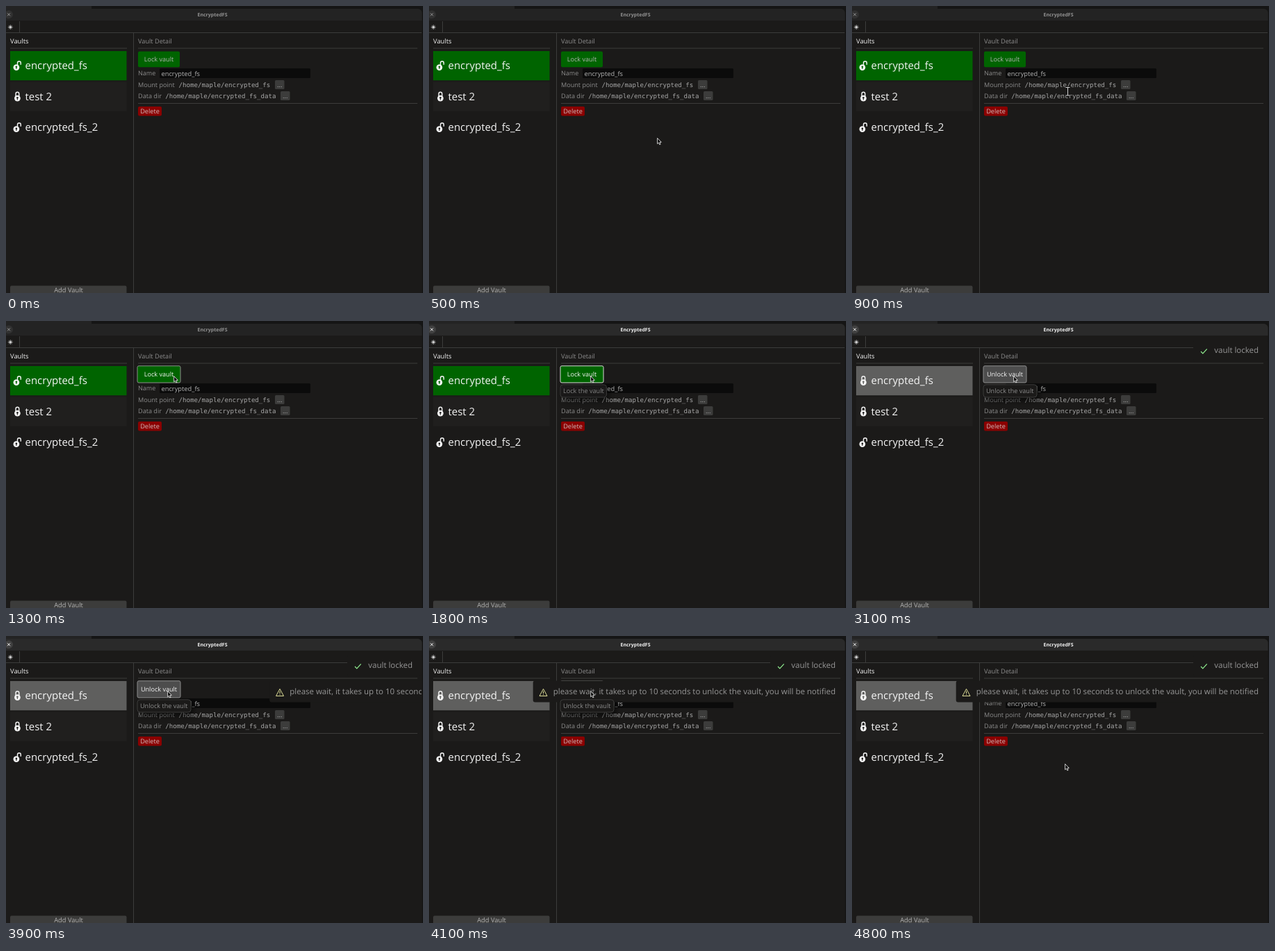
Recreate the animation shown at these times as an HTML page with a canvas. Size 600 by 414 pixels, loop 5 s.

```html
<!DOCTYPE html>
<html lang="en">
<head>
<meta charset="utf-8">
<title>EncryptedFS</title>
<style>
html, body { margin: 0; width: 100%; height: 100%; overflow: hidden; background: #1b1a19; }
canvas { display: block; }
</style>
</head>
<body>
<canvas id="stage" width="600" height="414"></canvas>
<script>
const c = document.getElementById('stage').getContext('2d');
const LOOP = 5000, STEP = 100;
const BG = '#1b1a19', LINE = '#3c3c3b', DIM = '#8c8c8c', MID = '#b4b4b4', WHITE = '#f4f4f4';
const SANS = '"Open Sans", "Noto Sans", sans-serif';
const MONO = '"DejaVu Sans Mono", monospace';

// Pointer positions, one per step
const ENTER = [[592, 254], [520, 243], [443, 224], [375, 204], [328, 190], [306, 184],
  [306, 172], [309, 150], [310, 123], [292, 100], [266, 86], [246, 79], [241, 79], [236, 79], [232, 79]];
const LEAVE = [[238, 83], [256, 98], [279, 126], [297, 160], [306, 184]];

function pointerAt(t) {
  if (t < 100) return null;
  const path = t < 4400 ? ENTER : LEAVE;
  const i = Math.floor((t - (t < 4400 ? 100 : 4400)) / STEP);
  return path[Math.min(i, path.length - 1)];
}

const inside = (p, x1, y1, x2, y2) => p && p[0] >= x1 && p[0] <= x2 && p[1] >= y1 && p[1] <= y2;

function box(x1, y1, x2, y2, fill, r = 0, stroke, width = 1) {
  c.beginPath();
  c.roundRect(x1, y1, x2 - x1, y2 - y1, r);
  if (fill) { c.fillStyle = fill; c.fill(); }
  if (stroke) { c.strokeStyle = stroke; c.lineWidth = width; c.stroke(); }
}

function text(s, x, y, color = DIM, size = 9.1, align = 'left', font = SANS, weight = 400) {
  c.font = `${weight} ${size}px ${font}`;
  c.textAlign = align;
  c.fillStyle = color;
  c.fillText(s, x, y);
}

function line(points, color, width = 1, close = false) {
  c.beginPath();
  points.forEach(([x, y]) => c.lineTo(x, y));
  if (close) c.closePath();
  c.strokeStyle = color;
  c.lineWidth = width;
  c.stroke();
}

function disc(x, y, r, color) {
  c.beginPath();
  c.arc(x, y, r, 0, 7);
  c.fillStyle = color;
  c.fill();
}

function padlock(y, open, hole) {
  const x = open ? 14.9 : 16.4, sx = open ? 18.9 : x, sy = y - 4;
  c.beginPath();
  c.moveTo(sx - 2.4, y);
  c.lineTo(sx - 2.4, sy);
  c.arc(sx, sy, 2.4, Math.PI, 0);
  c.lineTo(sx + 2.4, open ? sy + 2.5 : y);
  c.strokeStyle = WHITE;
  c.lineWidth = 1.4;
  c.stroke();
  disc(x, y + 2.4, 4.4, WHITE);
  disc(x, y + 1.5, 1.3, hole);
  line([[x, y + 1.5], [x, y + 4.8]], hole, 1.1);
}

function row(y, name, open, fill) {
  if (fill) box(6, y, 173.5, y + 42.3, fill);
  padlock(y + 21.2, open, fill || BG);
  text(name, 27.5, y + 26, WHITE, 15);
}

function frameWindow(active) {
  box(0, 0, 600, 414, '#151515');
  box(0, 0, 123, 5, '#232323');
  box(-6, 4, 598.5, 420, BG, 6);
  box(-6, 4, 598.5, 21, active ? '#2a2a2a' : '#232323', [6, 6, 0, 0]);
  disc(4, 12.3, 6, active ? '#404040' : '#313131');
  const ink = active ? '#f2f2f2' : '#929292';
  line([[2, 10.3], [6, 14.3]], ink);
  line([[6, 10.3], [2, 14.3]], ink);
  text('EncryptedFS', 297, 14.8, ink, 7, 'center', SANS, 700);

  for (let i = 0; i < 4; i++) {
    const a = i * Math.PI / 4, dx = 3.4 * Math.cos(a), dy = 3.4 * Math.sin(a);
    line([[6.3 - dx, 30.5 - dy], [6.3 + dx, 30.5 + dy]], '#d0d0d0', 0.8);
  }
  disc(6.3, 30.5, 1.6, '#d0d0d0');
  line([[19.5, 22], [19.5, 38]], LINE);
  line([[0, 38.5], [598, 38.5]], LINE);
  line([[183.5, 39], [183.5, 414]], LINE);
  line([[6, 61], [174, 61]], LINE);
  for (const y of [61, 140.5]) line([[190, y], [592, y]], LINE);
}

function pathRow(label, path, x, y, bx) {
  text(label, 190, y);
  text(path, x, y, '#a6a6a6', 9.15, 'left', MONO);
  box(bx, y - 9.5, bx + 13.5, y + 3.5, LINE, 1.5);
  text('...', bx + 6.7, y, MID, 9.1, 'center');
}

function lockButton(locked, hover, pressed) {
  const label = locked ? 'Unlock vault' : 'Lock vault';
  const fill = locked ? (hover ? '#4d4d4d' : LINE) : '#006400';
  if (hover) box(189, 64.8, 251, 89, fill, 2, pressed ? '#d8d8d8' : '#8c8c8c', 1);
  else box(190, 65.5, 250, 88.3, fill, 2);
  text(label, 220, 80, hover ? WHITE : MID, 9.1, 'center');
}

function tooltip(label, right, alpha) {
  c.save();
  c.globalAlpha = alpha;
  c.shadowColor = 'rgba(0,0,0,.5)';
  c.shadowOffsetX = 4;
  c.shadowOffsetY = 6;
  c.shadowBlur = 7;
  box(189, 92, right, 110, BG, 4);
  c.shadowColor = 'transparent';
  box(189, 91.8, right, 110, null, 4, LINE);
  text(label, 193, 104);
  c.restore();
}

function toast(left, top, born, t, label, icon) {
  const v = Math.min(1, (t - born) / 250);
  if (v <= 0) return;
  c.save();
  c.beginPath();
  c.rect(0, 21, 598, 393);
  c.clip();
  c.translate((598 - left) * (1 - v) ** 3, 0);
  box(left, top, 598, top + 31, BG, 3);
  text(label, 585, top + 19, '#969696', 11.47, 'right');
  icon();
  c.restore();
}

const check = () => line([[502, 44], [504.8, 46.9], [510.7, 40.3]], '#90ee90', 1.2);

function warning() {
  line([[164.5, 76.3], [170, 86.5], [159, 86.5]], '#dcdc96', 1, true);
  line([[164.5, 79.5], [164.5, 83]], '#dcdc96');
  line([[164.5, 84], [164.5, 85.1]], '#dcdc96');
}

function pointer(p, beam) {
  c.save();
  c.translate(p[0], p[1]);
  if (beam) {
    for (const [color, w] of [['#111', 2.4], ['#d8d8d8', 1]]) {
      line([[0.5, -5], [0.5, 6]], color, w);
      line([[-2.5, -5.5], [3.5, -5.5]], color, w);
      line([[-2.5, 6], [3.5, 6]], color, w);
    }
  } else {
    c.beginPath();
    for (const [x, y] of [[0.6, 0.6], [0.6, 8.8], [2.4, 7.2], [3.8, 10], [5.1, 9.4], [3.9, 6.6], [6.3, 6.4]]) c.lineTo(x, y);
    c.closePath();
    c.fillStyle = '#0c0c0c';
    c.fill();
    c.strokeStyle = '#dedede';
    c.lineWidth = 0.9;
    c.stroke();
  }
  c.restore();
}

function draw(t) {
  const p = pointerAt(t);
  const locked = t >= 1900;
  const overButton = inside(p, 190, 66, 250, 88);
  const overField = inside(p, 221, 90, 438, 104);
  const pressed = (t >= 1800 && t < 1900) || (t >= 3700 && t < 3900);

  frameWindow(t >= 1700);
  text('Vaults', 6, 54, '#eeeeee', 9.4);
  row(65, 'encrypted_fs', !locked, locked ? '#5f5f5e' : '#006400');
  row(109.5, 'test 2', false, '#201f1e');
  row(154, 'encrypted_fs_2', true);
  box(6, 403.5, 173.5, 418, LINE, 2);
  text('Add Vault', 90, 413, MID, 9.3, 'center');

  text('Vault Detail', 190, 54, DIM, 9.2);
  lockButton(locked, overButton, pressed);
  text('Name', 190, 100, DIM, 9);
  box(221, 90, 438, 104, '#0b0b0b', 1.5, overField && '#969696');
  text('encrypted_fs', 223.5, 100.5, MID, 9.3);
  pathRow('Mount point', '/home/maple/encrypted_fs', 248.5, 116.5, 387);
  pathRow('Data dir', '/home/maple/encrypted_fs_data', 229.2, 132.5, 395);
  box(190, 145, 224, 158.6, '#8b0000', 2);
  text('Delete', 207, 155, '#d0bcbc', 9.2, 'center');

  toast(491, 27, 1850, t, 'vault locked', check);
  toast(149.7, 64.6, 3850, t,
    'please wait, it takes up to 10 seconds to unlock the vault, you will be notified', warning);
  if (t >= 1700 && t < 4400) {
    if (locked) tooltip('Unlock the vault', 266, 1);
    else tooltip('Lock the vault', 255.5, t < 1800 ? 0.5 : 0.92);
  }
  if (p) pointer(p, overField || inside(p, 229, 107, 389, 136));
}

c.textRendering = 'geometricPrecision';
const start = performance.now();
function tick() {
  const t = (performance.now() - start) % LOOP;
  draw(Math.floor(t / STEP) * STEP);
  requestAnimationFrame(tick);
}
tick();
</script>
</body>
</html>
```
